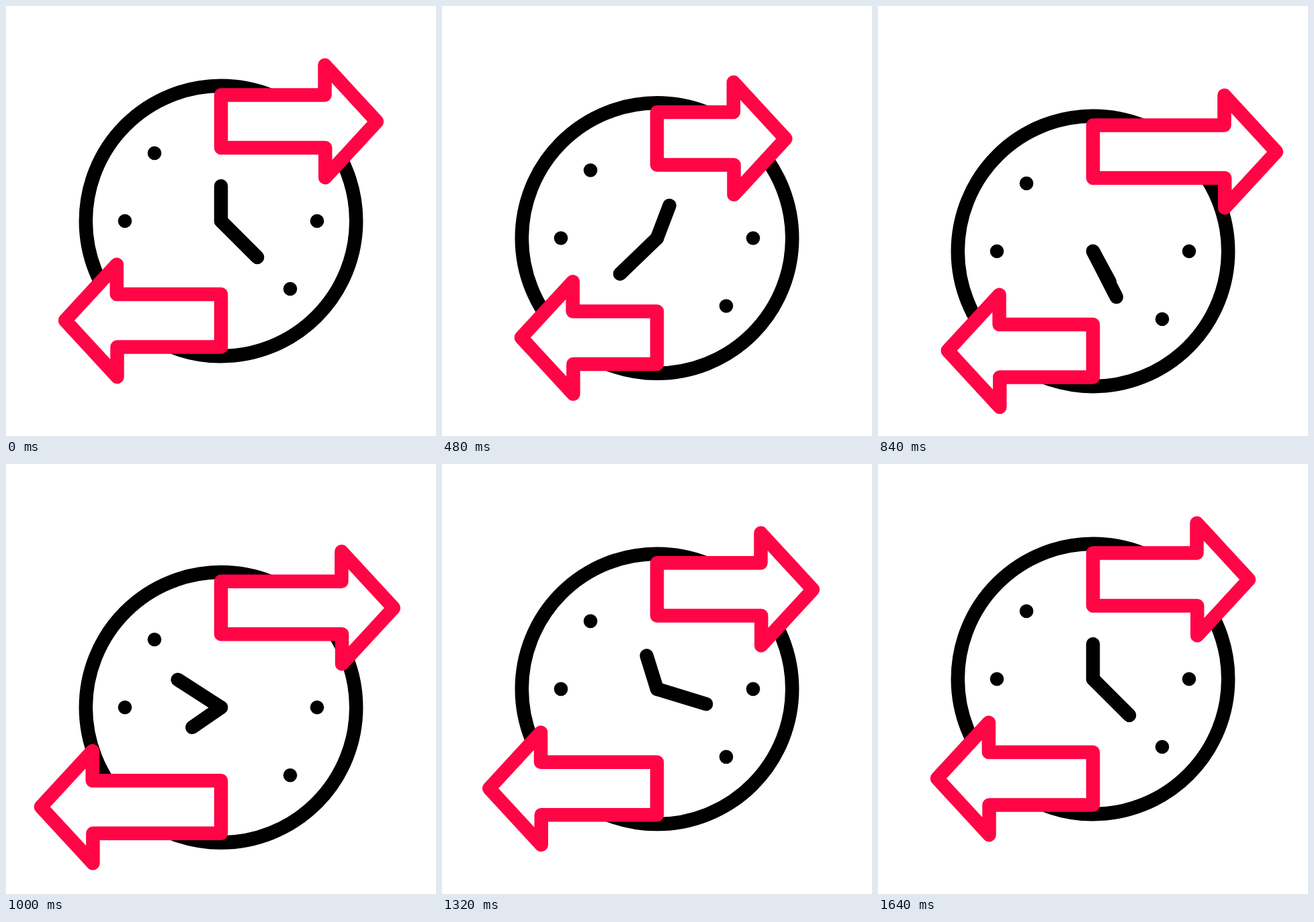
Recreate the animation shown at these times as an HTML page. Size 640x640 px, loop 1680 ms.

```html
<!DOCTYPE html>
<html lang="en">
<head>
<meta charset="utf-8">
<title>Clock with arrows</title>
<style>
  html, body { margin: 0; width: 100%; height: 100%; overflow: hidden; background: #fff; }
  svg { display: block; width: 100vw; height: 100vh; }
  .line { stroke-width: 20.5; stroke-linecap: round; stroke-linejoin: round; fill: #fff; }
  .ink { stroke: #000; }
  .accent { stroke: #ff0545; }
</style>
</head>
<body>
<svg viewBox="0 0 640 640">
  <g id="scene">
    <circle class="line ink" cx="320" cy="320" r="201.2"/>
    <circle cx="221" cy="219" r="10.3"/>
    <circle cx="177" cy="320" r="10.3"/>
    <circle cx="463" cy="320" r="10.3"/>
    <circle cx="423" cy="421" r="10.3"/>
    <path id="hour" class="line ink" d="M320 320V268"/>
    <path id="minute" class="line ink" d="M320 320V243.5"/>
    <path id="right" class="line accent"/>
    <path id="left" class="line accent" transform="rotate(180 320 320)"/>
  </g>
</svg>
<script>
const LOOP = 1680, STEP = 40;
const el = id => document.getElementById(id);
const [scene, hour, minute, right, left] =
  ['scene', 'hour', 'minute', 'right', 'left'].map(el);

// Cubic Bezier easing with handles (a, 0) and (b, 1)
const bezier = (a, b) => x => {
  if (x <= 0) return 0;
  if (x >= 1) return 1;
  let lo = 0, hi = 1;
  for (let i = 0; i < 30; i++) {
    const s = (lo + hi) / 2, r = 1 - s;
    if (3 * a * s * r * r + 3 * b * s * s * r + s * s * s < x) lo = s;
    else hi = s;
  }
  return lo * lo * (3 - 2 * lo);
};
const easeMove = bezier(0.42, 0.58);
const easeDrop = bezier(0.58, 0.5);

// Sum of eased moves: [start, end, distance]
const moves = (list, ease) => t =>
  list.reduce((sum, [from, to, by]) => sum + by * ease((t - from) / (to - from)), 0);

// Smooth monotone curve through [time, value] points, at rest at both ends
function curve(pts) {
  const gap = i => pts[i + 1][0] - pts[i][0];
  const rate = i => (pts[i + 1][1] - pts[i][1]) / gap(i);
  const slope = pts.map((p, i) => {
    if (i === 0 || i === pts.length - 1) return 0;
    const g = gap(i - 1), h = gap(i), p0 = rate(i - 1), p1 = rate(i);
    return Math.min((h * p0 + g * p1) / (g + h), 3 * p0, 3 * p1);
  });
  return t => {
    const i = pts.findIndex((p, k) => k < pts.length - 1 && t < pts[k + 1][0]);
    if (i < 0) return pts[pts.length - 1][1];
    const h = gap(i), u = (t - pts[i][0]) / h, v = 1 - u;
    return pts[i][1] * v * v * (1 + 2 * u) + slope[i] * h * u * v * v +
      pts[i + 1][1] * u * u * (3 - 2 * u) - slope[i + 1] * h * u * u * v;
  };
}

const drop = moves([[20, 840, 45], [820, 1640, -45]], easeDrop);
const reach = moves([[0, 360, -51], [388, 782, 92], [835, 1212, -41]], easeMove);
const LEFT_DELAY = 282;

const minuteAngle = curve([[0, 135], [320, 167.5], [480, 226], [680, 359.5],
  [1000, 662.7], [1320, 827], [1640, 855]]);
const hourAngle = curve([[0, 0], [320, 3.3], [480, 20.9], [680, 72.8],
  [1000, 235.4], [1320, 342.7], [1640, 360]]);

const arrow = d => `M320 132.5H${474.5 + d}V88L${552 + d} 172L${475.2 + d} 255.3V211H320Z`;
const turn = (node, deg) => node.setAttribute('transform', `rotate(${deg} 320 320)`);

function draw(now) {
  const t = Math.floor((now % LOOP) / STEP) * STEP;
  scene.setAttribute('transform', `translate(0 ${drop(t)})`);
  turn(hour, hourAngle(t));
  turn(minute, minuteAngle(t));
  right.setAttribute('d', arrow(reach(t)));
  left.setAttribute('d', arrow(reach(t - LEFT_DELAY)));
}

const start = performance.now();
function tick() {
  draw(performance.now() - start);
  requestAnimationFrame(tick);
}
tick();
</script>
</body>
</html>
```
